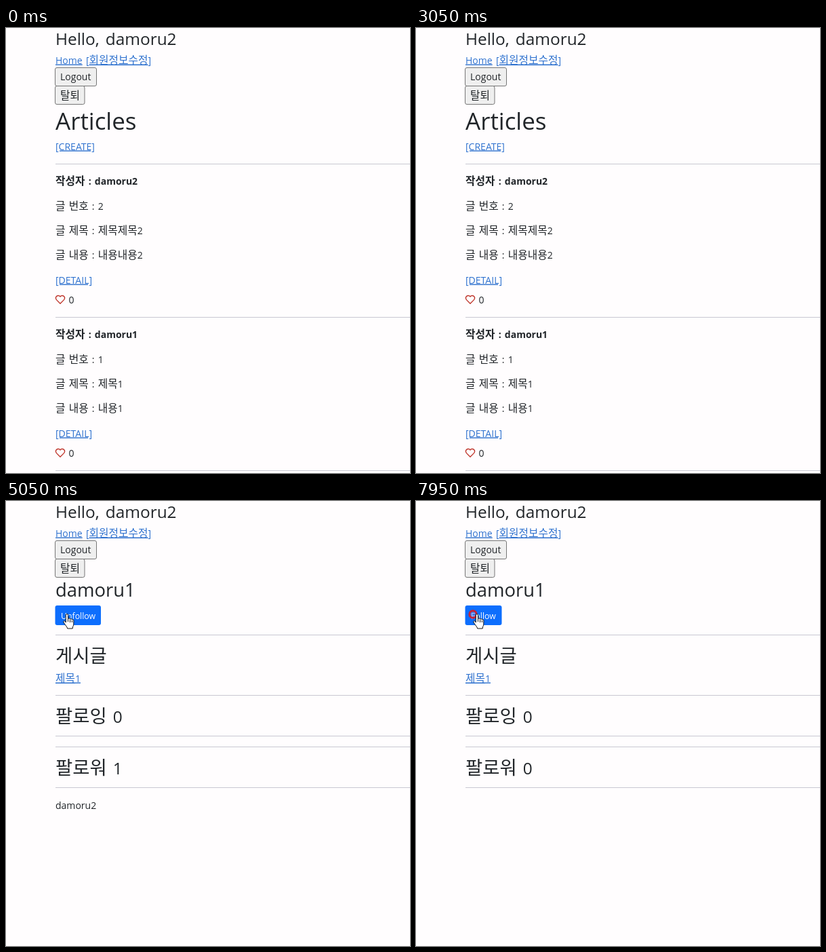
These frames come from a looping animation (596x656 px, 8 s). An HTML page:

```html
<!DOCTYPE html>
<html lang="ko">
<head>
<meta charset="utf-8">
<title>Follow</title>
<style>
  html, body { margin: 0; width: 100%; height: 100%; overflow: hidden; background: #fffdfe; }
  svg { display: block; }
  text { font: 14px "Open Sans", "Noto Sans CJK KR", "Noto Sans CJK", sans-serif; fill: #212529; word-spacing: .11em; white-space: pre; }
  tspan { font-family: "Noto Sans CJK KR", "Noto Sans CJK", sans-serif; font-size: 1.125em; font-weight: 350; }
  .h1 { font-size: 35px; }
  .h2 { font-size: 27.4px; }
  .h3 { font-size: 24.4px; }
  .bold, .bold tspan { font-weight: 700; }
  .link { fill: #2f72cf; text-decoration: underline 1px; text-underline-offset: 2px; text-decoration-skip-ink: none; }
  .label { font-size: 12.3px; fill: #fff; }
  .plain { fill: #efefef; stroke: #767676; }
  .rule { stroke: #c9c8d2; }
  .heart { fill: none; stroke: #c0392f; stroke-width: 1.4; }
  .pointer { fill: #fff; stroke: #111; stroke-linejoin: round; }
</style>
</head>
<body>
<svg id="stage" width="596" height="656" viewBox="0 0 596 656"></svg>
<script>
const LEFT = 73, LOOP = 8000;

// Hangul runs are set slightly larger than Latin ones.
const text = (y, str, cls = '', x = LEFT) =>
  `<text x="${x}" y="${y}" class="${cls}">${str.replace(/[가-힣]+/g, '<tspan>$&</tspan>')}</text>`;
const rule = y => `<path class="rule" d="M${LEFT} ${y}H596"/>`;
const box = (y, w, label, baseline) =>
  `<rect class="plain" x="72.5" y="${y}" width="${w}" height="27" rx="2.5"/>` + text(baseline, label, '', 80);

const article = (top, n, title, body) => `<g transform="translate(0 ${top})">` +
  text(31, `작성자 : damoru${n}`, 'bold') +
  text(67.5, `글 번호 : ${n}`) +
  text(104, `글 제목 : ${title}`) +
  text(140, `글 내용 : ${body}`) +
  text(176.5, '[DETAIL]', 'link') +
  '<path class="heart" d="M80 206.3l-5.3-5.4c-3.6-4.2 2-8.9 5.3-4.9 3.3-4 8.9.7 5.3 4.9z"/>' +
  text(206, '0', '', 92.5) + rule(226.5) + '</g>';

const header = text(25, 'Hello, damoru2', 'h3') +
  text(52.5, 'Home', 'link') + text(52.5, '[회원정보수정]', 'link', 118) +
  box(58.5, 61, 'Logout', 77) + box(85.5, 43.5, '탈퇴', 104.5);

const list = text(150, 'Articles', 'h1') + text(179.5, '[CREATE]', 'link') + rule(200.5) +
  article(200, 2, '제목제목2', '내용내용2') + article(426, 1, '제목1', '내용1');

const profile = text(141, 'damoru1', 'h2') +
  `<rect id="focus" x="69" y="150.5" width="74" height="36" rx="6" fill="#8db5fa"/>
   <rect id="button" x="72.5" y="154" height="29" rx="3"/>
   <text id="action" class="label" x="81" y="173.5"></text>` +
  rule(197.5) + text(238, '게시글', 'h3') + text(266.5, '제목1', 'link') +
  rule(286.5) + text(327, '팔로잉 0', 'h3') + rule(346.5) +
  rule(362.5) + `<g id="one">${text(402.5, '팔로워 1', 'h3')}${text(453.5, 'damoru2')}</g>` +
  `<g id="none">${text(402.5, '팔로워 0', 'h3')}</g>` + rule(422.5);

const cursor = `
  <g id="blue" fill="none"><circle r="10" stroke="#55c8ff" stroke-width="8" opacity=".7" filter="url(#soft)"/>
    <circle r="9" stroke="#159cec" stroke-width="3" stroke-dasharray="1.2 1.1" opacity=".8"/></g>
  <g id="red"><circle r="7.5" fill="#f5a59f" opacity=".6"/>
    <circle r="4.8" fill="#fff" fill-opacity=".8" stroke="#e0322f" stroke-width="2.6"/></g>
  <g id="redSmall"><circle r="5.2" fill="#6f86dd" fill-opacity=".5" stroke="#c3243a" stroke-width="3"/></g>
  <g id="hand" class="pointer">
    <path d="M-1.7 12V1.2a1.6 1.6 0 0 1 3.2 0V7c0-1.6 3-1.4 3 .4 0-1.3 2.8-1.1 2.8.7 0-1 2.5-.8 2.5.9v5.5c0 2.5-1.6 3.3-1.6 6.5H.6c0-2.5-3.6-5-5.6-9.2-.9-2 1.6-2.7 2.6-1z"/>
    <path d="M1.5 7v4M4.5 8v4M7.3 9v3"/></g>
  <g id="arrow" class="pointer"><path d="M0 0V16l3.7-3.5 2.6 5.8 2.4-1-2.5-5.7H11z"/></g>
  <circle id="busy" cx="13" r="5" fill="#fff" stroke="#238fe6" stroke-width="3.6"/>`;

document.getElementById('stage').innerHTML =
  `<filter id="soft" x="-50%" y="-50%" width="200%" height="200%"><feGaussianBlur stdDeviation="1.5"/></filter>
   ${header}<g id="list">${list}</g><g id="profile">${profile}</g><g id="cursor">${cursor}</g>`;

const el = id => document.getElementById(id);
const show = (id, on) => el(id).setAttribute('display', on ? 'inline' : 'none');
const move = (id, x, y) => el(id).setAttribute('transform', `translate(${x} ${y})`);
const within = (t, ...spans) => spans.some(([from, to]) => t >= from && t < to);

const path = [[0, 137, 449], [4200, 137, 449], [4400, 139, 464], [4600, 139, 464], [5000, 90, 167], [LOOP, 90, 167]];
function position(t) {
  const i = path.findIndex(p => p[0] > t);
  const [t0, x0, y0] = path[i - 1], [t1, x1, y1] = path[i];
  const k = (t - t0) / (t1 - t0), ease = k * k * (3 - 2 * k);
  return [x0 + (x1 - x0) * ease, y0 + (y1 - y0) * ease];
}

function render(t) {
  const onList = t < 3400;
  const following = !within(t, [5700, 6550], [7900, LOOP]);
  const pressed = within(t, [5500, 5700], [6400, 6550], [7700, 7900]);
  const arrow = within(t, [4250, 4950]);

  show('list', onList);
  show('profile', !onList);
  show('one', following);
  show('none', !following);
  show('focus', pressed);
  el('focus').setAttribute('width', following ? 74 : 60.5);
  el('button').setAttribute('width', following ? 67.5 : 54);
  el('button').setAttribute('fill', pressed ? '#0a58ca' : '#0d6efd');
  el('action').textContent = following ? 'Unfollow' : 'Follow';

  show('cursor', t >= 3350);
  move('cursor', ...position(t));
  show('hand', !arrow);
  show('arrow', arrow);
  show('busy', within(t, [4350, 4650]));
  show('blue', pressed || within(t, [3350, 3650]));
  show('red', within(t, [4400, 4600]));
  show('redSmall', within(t, [6550, 6750], [7900, LOOP]));
}

move('blue', -5.5, -1);
move('red', 0, -8);
move('redSmall', -6, 0);

const start = performance.now();
function tick() {
  render((performance.now() - start) % LOOP);
  requestAnimationFrame(tick);
}
tick();
</script>
</body>
</html>
```
